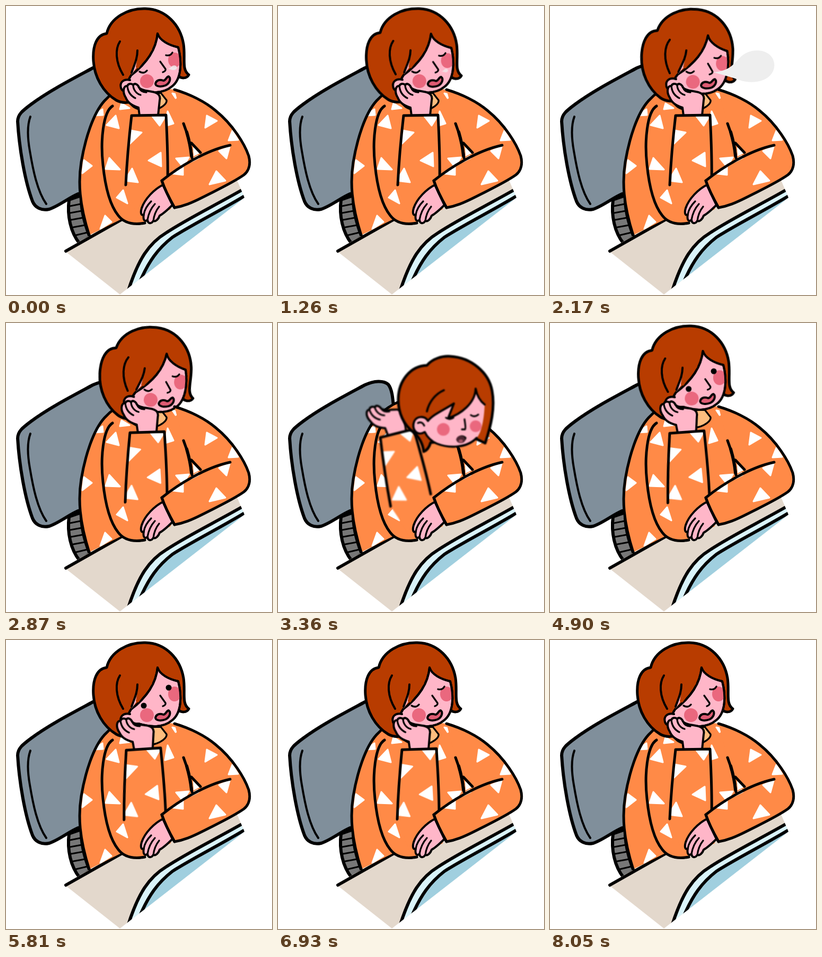
Write an HTML page that moves like this. It is 502 px wide and 546 px high and loops after 8.12 s.

```html
<!DOCTYPE html>
<html lang="en">
<head>
<meta charset="utf-8">
<title>Dozing at the desk</title>
<style>
html, body { margin: 0; width: 100%; height: 100%; overflow: hidden; background: #fff; }
svg { display: block; width: 100%; height: 100%; }

.ink { stroke: #000; stroke-width: 5; stroke-linecap: round; stroke-linejoin: round; fill: none; }
.bold { stroke-width: 6; }
.fine { stroke-width: 4; }
.thin { stroke-width: 3.3; }
.orange { fill: #ff8a47; }
.skin { fill: #ffb6c8; }
.hair { fill: #b83c00; }
.blush { fill: #ea687e; }
.lip { fill: #df5b73; }
.chair { fill: #808f9b; }
.stem { fill: #777; }
.collar { fill: #ffbd7e; }
.rim { fill: #d9f3fa; }
.glass { fill: #a0cfdf; }
.dots { fill: #fff; stroke: #fff; stroke-width: 3; stroke-linejoin: round; }

.anim { animation: 8120ms infinite ease-in-out; }
.step { animation: 8120ms infinite step-end; }
.lean { animation-name: lean; transform-origin: 265px 180px; }
.drop { animation-name: drop; transform-origin: 330px 230px; }
.swing { animation-name: swing; transform-origin: 255px 400px; }
.half { animation-name: half; transform-origin: 255px 400px; }
.puff { animation-name: puff; transform-origin: 308px 123px; }
.smear { animation-name: smear; }
.upright { animation-name: upright; }
.fallen { animation-name: fallen; }
.open { animation-name: open; }
.shut { animation-name: shut; }

@keyframes lean {
  0% { transform: none; }
  8.62% { transform: rotate(4deg); }
  17.2% { transform: rotate(1deg); }
  26.72%, 34.5% { transform: translate(0, 1px) rotate(5.5deg); }
  37.9% { transform: translate(20px, 15px) rotate(14deg); }
  56.9% { transform: translate(12px, 8px) rotate(9deg); }
  61.2%, 100% { transform: none; }
}
@keyframes drop {
  0%, 37.9% { transform: translate(-50px, -35px) rotate(-10deg); }
  40.52% { transform: translate(0, 3px); }
  41.38% { transform: translate(0, 2px); }
  43.1% { transform: translate(0, -13px); }
  46.8%, 54.3% { transform: none; }
  56.9%, 100% { transform: translate(-45px, -32px) rotate(-8deg); }
}
@keyframes swing {
  0%, 34.5% { transform: rotate(0deg); }
  37.9% { transform: rotate(-7deg); }
  40.52%, 41.38% { transform: rotate(-13.3deg); }
  43.1% { transform: rotate(-17.5deg); }
  46.8%, 54.3% { transform: rotate(-13.3deg); }
  61.2%, 71.55% { transform: rotate(-3deg); }
  85.34% { transform: rotate(-.9deg); }
  92.4%, 100% { transform: rotate(0deg); }
}
@keyframes half {
  0%, 34.5% { transform: rotate(0deg); }
  40.52%, 41.38% { transform: rotate(7deg); }
  43.1% { transform: rotate(9deg); }
  46.8%, 54.3% { transform: rotate(7deg); }
  61.2%, 71.55% { transform: rotate(2deg); }
  92.4%, 100% { transform: rotate(0deg); }
}
@keyframes puff {
  0% { transform: translate(-3px, -5px) scale(.15); opacity: .85; }
  8.62% { transform: scale(.93); opacity: 1; }
  15% { transform: scale(.12); opacity: .8; }
  17.2% { transform: scale(.05); opacity: 0; }
  19.8% { transform: scale(.1); opacity: .8; }
  26.72% { transform: scale(1); opacity: 1; }
  29% { transform: scale(1.03); opacity: 1; }
  32.5%, 99.2% { transform: scale(.1); opacity: 0; }
  100% { transform: translate(-3px, -5px) scale(.15); opacity: .85; }
}
@keyframes smear {
  0%, 36% { filter: blur(0); }
  38.5%, 41.5% { filter: blur(1.2px); }
  42.3%, 100% { filter: blur(0); }
}
@keyframes upright { 0% { opacity: 1; } 37.9% { opacity: 0; } 56.9%, 100% { opacity: 1; } }
@keyframes fallen { 0% { opacity: 0; } 37.9% { opacity: 1; } 56.9%, 100% { opacity: 0; } }
@keyframes open {
  0% { opacity: 0; } 42.24% { opacity: 1; } 64.7% { opacity: 0; } 66.4% { opacity: 1; }
  77.6% { opacity: 0; } 80% { opacity: 1; } 83.7%, 100% { opacity: 0; }
}
@keyframes shut {
  0% { opacity: 1; } 42.24% { opacity: 0; } 64.7% { opacity: 1; } 66.4% { opacity: 0; }
  77.6% { opacity: 1; } 80% { opacity: 0; } 83.7%, 100% { opacity: 1; }
}
</style>
</head>
<body>
<svg viewBox="0 0 502 546">
  <defs>
    <path id="torso" d="M230 148 C212 155 197 167 186 179 C164 203 149 253 142 295 C136 332 138 373 157 433 L217 403 L310 385 L352 288 L380 270 L390 195 C370 178 345 164 318 158Z"/>
    <path id="cuffArm" d="M318 158 C345 166 375 180 396 198 C428 224 450 260 458 283 C462 298 459 311 449 319 C428 334 395 349 370 362 C350 372 336 378 318 381 C309 365 300 348 294 330 C306 318 340 300 365 288 L353 262 L335 222Z"/>
    <path id="sleeve" d="M237 207 L302 206 L305 334 L288 388 L250 402 L226 338Z"/>
    <path id="faceUp" d="M286 52 C290 65 307 74 325 78 C332 104 332 138 313 152 C297 166 272 165 250 158 L230 160 C226 148 232 137 236 131 C262 111 283 85 286 52Z"/>
    <path id="faceDown" d="M373 122 C376 138 382 146 390 152 C389 180 384 205 375 215 C355 236 320 234 300 226 C290 222 281 213 277 204 C262 213 251 198 257 184 C262 173 277 173 283 183 C292 171 312 163 332 150 L321 178 C345 170 372 150 373 122Z"/>
    <clipPath id="inTorso"><use href="#torso"/></clipPath>
    <clipPath id="inCuffArm"><use href="#cuffArm"/></clipPath>
    <clipPath id="inSleeve"><use href="#sleeve"/></clipPath>
    <clipPath id="inFaceUp"><use href="#faceUp"/></clipPath>
    <clipPath id="inFaceDown"><use href="#faceDown"/></clipPath>
    <clipPath id="inDesk"><path d="M110 462 L217 398 L436 329 L450 362 L215 545Z"/></clipPath>
  </defs>

  <!-- chair -->
  <path class="ink bold chair" d="M22 218 C22 205 31 198 47 186 C82 160 127 137 164 117 C181 109 199 108 208 116 C217 127 217 150 220 180 L190 345 L136 355 C119 362 98 379 81 384 C67 387 55 381 50 369 C36 332 25 270 22 218Z"/>
  <path class="ink fine" d="M46 209 C40 225 40 246 45 274 C51 310 59 350 76 374"/>
  <path class="ink bold stem" d="M119 366 C115 396 122 428 139 449 L158 436 C147 408 141 384 142 358Z"/>
  <path class="ink thin" d="M121 378 L141 374 M121 391 L143 387 M123 404 L145 400 M127 418 L149 414 M132 433 L153 428"/>

  <!-- desk -->
  <g clip-path="url(#inDesk)">
    <path fill="#e3d8cc" d="M100 466 L217 400 L440 320 L460 370 L215 550Z"/>
    <path class="ink bold rim" d="M455 342 C400 374 342 402 303 428 C270 448 250 477 230 540 L470 540Z"/>
    <path class="ink bold glass" d="M460 353 C410 384 355 411 314 437 C287 458 269 482 251 525 L470 540Z"/>
  </g>
  <path class="ink bold" stroke-linecap="butt" d="M113 463 L219 403"/>

  <!-- torso -->
  <use href="#torso" class="orange"/>
  <path class="dots" clip-path="url(#inTorso)" d="M182 195 L164 207 L183 206Z M147 291 L162 302 L144 316Z M187 396 L199 408 L178 421Z M207 207 L190 225 L213 231Z M218 184 L233 193 L215 195Z M314 165 L327 168 L320 174Z M305 199 L316 222 L300 227Z M321 288 L345 286 L334 304Z M195 287 L215 309 L188 308Z"/>
  <path class="ink" d="M230 148 C212 155 197 167 186 179 C164 203 149 253 142 295 C136 332 138 373 157 433"/>
  <path class="ink thin collar" d="M233 180 C238 197 270 203 290 193 C298 189 304 183 303 178 L292 164 L240 166Z"/>
  <path class="orange" d="M212 396 C225 413 245 413 262 410 L300 370 L250 350 L205 370Z"/>
  <path class="dots" d="M221 348 L229 373 L209 362Z M259 361 L277 351 L268 364Z"/>
  <path class="ink" d="M201 189 C183 200 178 255 183 300 C187 340 195 375 212 396 C225 413 245 413 262 410"/>

  <!-- upright head -->
  <g class="step upright"><g class="anim smear"><g class="anim lean">
    <path class="ink hair" d="M190 52 C197 22 230 4 263 5 C302 6 329 36 335 72 C339 99 331 120 345 130 C341 138 330 137 325 132 L250 172 C242 184 220 185 208 178 C183 163 167 134 165 104 C163 76 171 54 190 52Z"/>
    <use href="#faceUp" class="ink fine skin"/>
    <g clip-path="url(#inFaceUp)" class="blush">
      <circle cx="266" cy="142" r="13"/>
      <ellipse cx="318" cy="102" rx="12" ry="14"/>
    </g>
    <use href="#faceUp" class="ink fine"/>
    <path class="skin" d="M248 88 L249 112 L237 130Z"/>
    <path class="hair" d="M250 80 L276 82 L250 118 L245 116Z"/>
    <path class="ink fine" d="M215 67 C206 81 206 105 221 130 M248 84 C248 100 242 111 237 126"/>
    <path class="ink fine skin" d="M234 140 C221 137 214 145 217 155 C219 161 226 164 233 161"/>
    <path class="ink thin" d="M291 105 L301 119 Q302 123 296 125"/>
    <path class="ink fine lip" d="M282 147 C283 141 289 138 297 141 C302 141 302 134 307 133 C312 137 309 146 301 150 C294 153 283 153 282 147Z"/>
    <g class="step shut"><path class="ink thin" d="M252 124 Q260 129 266 122 M302 93 Q310 95 314 88"/></g>
    <g class="step open"><circle cx="260" cy="124" r="5.5"/><circle cx="307" cy="90" r="5.5"/></g>
  </g></g></g>

  <path class="anim puff" fill="#eee" d="M308 125 C335 124 345 112 358 98 C372 82 398 80 412 90 C426 100 426 118 418 128 C408 143 380 148 358 140 C345 135 332 132 308 125Z"/>

  <!-- propping arm -->
  <g class="anim smear"><g class="anim swing">
    <path class="ink fine skin" d="M252 207 L250 192 C240 189 230 184 226 173 C219 162 222 150 229 151 C231 146 237 146 240 149 C243 145 249 148 251 154 C256 160 266 160 276 162 C288 164 292 170 290 178 L287 207"/>
    <path class="ink thin" d="M229 151 C230 163 236 170 244 174 M240 149 C240 158 246 166 254 168 M251 154 C253 160 258 163 265 163"/>
    <use href="#sleeve" class="orange"/>
    <g clip-path="url(#inSleeve)" class="dots">
      <path d="M230 234 L256 239 L234 260Z M292 277 L293 303 L269 292Z M276 208 L301 208 L290 226Z"/>
      <path class="anim half" d="M238 307 L249 333 L224 330Z"/>
    </g>
    <path class="ink" d="M226 338 C228 296 232 250 237 207 L302 206 C304 246 306 290 305 333"/>
  </g></g>

  <!-- resting arm -->
  <use href="#cuffArm" class="orange"/>
  <path fill="#fff" d="M353 266 L366 278 L354 284Z"/>
  <path class="dots" clip-path="url(#inCuffArm)" d="M379 207 L398 217 L376 230Z M427 236 L438 253 L420 254Z M402 274 L422 266 L416 288Z M397 312 L414 330 L384 337Z M334 304 L309 316 L334 319Z"/>
  <path class="ink" d="M318 158 C345 166 375 180 396 198 C428 224 450 260 458 283 C462 298 459 311 449 319 C428 334 395 349 370 362 C350 372 336 378 318 381 C309 365 300 348 294 330 C325 305 376 273 423 263 M335 222 C344 245 349 266 351 287 M350 259 L367 277"/>
  <path class="ink bold" d="M341 238 Q348 262 350 283"/>
  <path class="ink fine skin" d="M296 338 C280 346 262 364 256 382 C253 392 256 397 260 394 C258 404 262 409 267 404 C268 412 274 412 278 406 C283 408 288 402 290 396 C298 392 306 384 314 376Z"/>
  <path class="ink thin" d="M274 369 Q262 381 260 394 M281 374 Q270 386 267 404 M289 379 Q280 390 278 406"/>
  <path class="ink" d="M318 381 C309 365 300 348 294 330"/>

  <!-- slumped head -->
  <g class="step fallen"><g class="anim smear"><g class="anim drop">
    <path class="ink hair" d="M281 78 C292 65 310 60 325 61 C365 63 398 92 404 126 C410 158 402 192 391 225 L374 217 L288 224 C286 231 283 238 275 241 C273 225 266 213 255 204 C238 191 226 168 227 140 C228 108 249 79 281 78Z"/>
    <use href="#faceDown" class="skin"/>
    <g clip-path="url(#inFaceDown)" class="blush">
      <circle cx="312" cy="199" r="12"/>
      <circle cx="373" cy="193" r="11"/>
    </g>
    <path class="ink fine" d="M375 215 C355 236 320 234 300 226 C290 222 281 213 277 204 C262 213 251 198 257 184 C262 173 277 173 283 183 C292 171 312 163 332 150 L321 178 C345 170 372 150 373 122 C376 138 382 146 390 152"/>
    <path class="ink fine" d="M313 125 C297 132 285 147 281 165"/>
    <path class="ink thin" d="M264 187 Q272 183 276 192 M352 180 C353 188 355 197 353 199 L347 199"/>
    <path class="ink thin lip" d="M338 218 C342 211 349 210 354 215 C353 221 345 222 338 218Z"/>
    <g class="step shut">
      <path class="ink thin" d="M317 177 Q324 182 331 177 M364 172 Q371 177 378 171"/>
      <ellipse cx="345" cy="218" rx="8.5" ry="7" fill="#4b2430"/>
      <ellipse cx="345" cy="221" rx="4" ry="3" fill="#a65465"/>
    </g>
    <g class="step open"><circle cx="324" cy="175" r="5.5"/><circle cx="371" cy="168" r="5.5"/></g>
  </g></g></g>
</svg>
</body>
</html>
```
